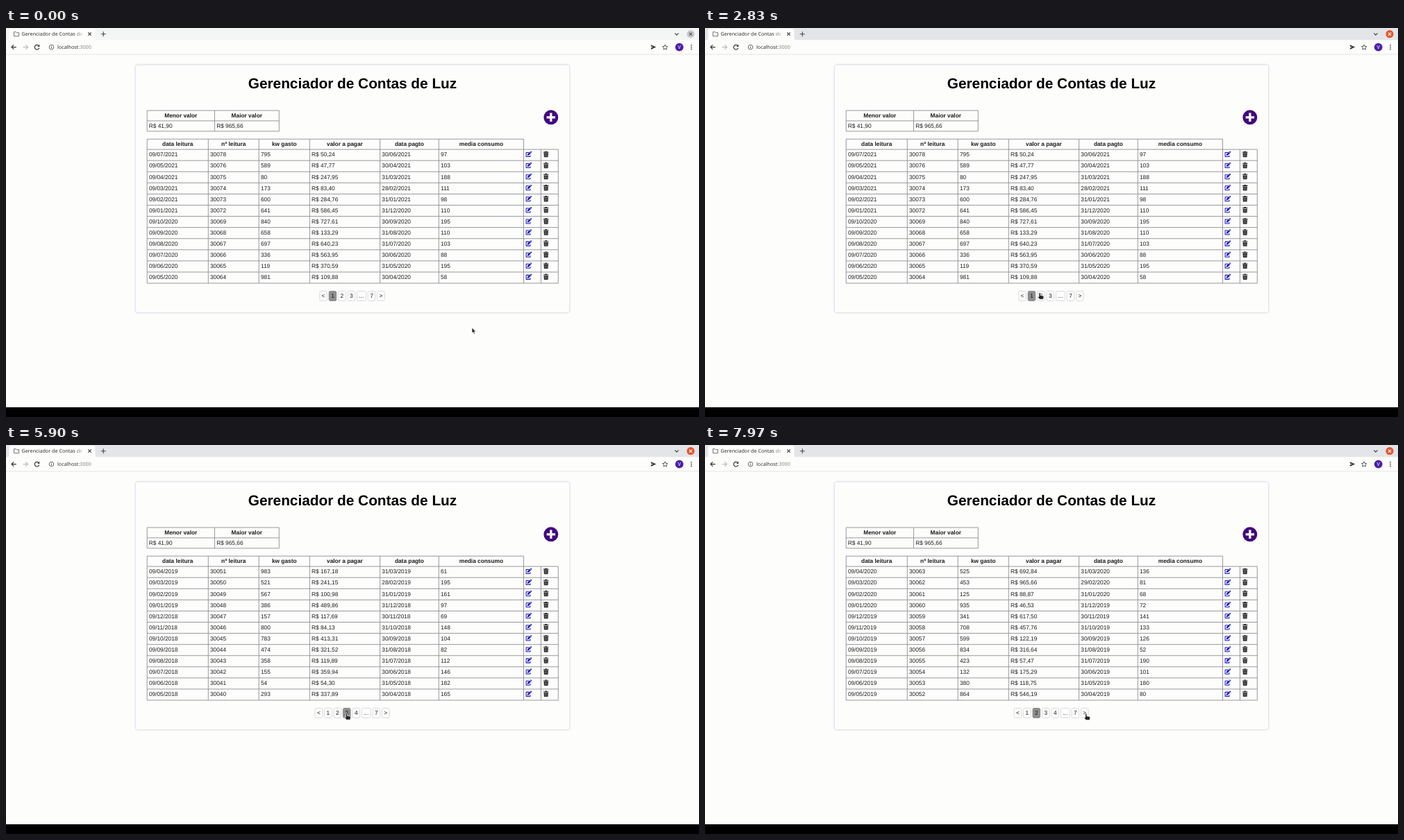
Write an HTML page that moves like this. It is 998 px wide and 561 px high and loops after 8000 ms.

```html
<!DOCTYPE html>
<html lang="pt">
<head>
<meta charset="utf-8">
<title>Gerenciador de Contas de Luz</title>
<style>
html, body { margin: 0; width: 100%; height: 100%; overflow: hidden; background: #fdfdfc; }
svg { display: block; width: 998px; height: 561px; }
text { font: 8.32px "Liberation Sans", Arial, sans-serif; fill: #1a1a1a; white-space: pre; text-rendering: geometricPrecision; }
.th { font-weight: bold; text-anchor: middle; }
.mid { text-anchor: middle; }
.title { font-size: 20.8px; font-weight: bold; text-anchor: middle; fill: #000; }
.ui { font: 7.2px "Noto Sans", "Open Sans", sans-serif; fill: #333; }
.line { fill: none; stroke: #8e8e94; stroke-width: .9; }
.ico { fill: none; stroke: #444; stroke-width: 1.1; }
</style>
</head>
<body>
<svg id="stage" viewBox="0 0 998 561" xmlns="http://www.w3.org/2000/svg"></svg>
<script>
const LOOP = 8000;
const stage = document.getElementById('stage');

// Per reading, newest first: kWh, amount, average
const BILLS = [
  '795 50,24 97|589 47,77 103|80 247,95 188|173 83,40 111|600 284,76 98|641 586,45 110|' +
  '840 727,61 195|658 133,29 110|697 640,23 103|336 563,95 88|119 370,59 195|981 109,88 58',
  '525 692,84 136|453 965,66 81|125 88,87 68|935 46,53 72|341 617,50 141|708 457,76 133|' +
  '599 122,19 126|834 316,64 52|423 57,47 190|132 175,29 101|380 118,75 180|864 546,19 80',
  '983 167,18 61|521 241,15 195|567 100,98 161|386 489,86 97|157 117,69 69|800 84,13 148|' +
  '783 413,31 104|474 321,52 82|358 119,89 112|155 359,94 146|54 54,30 182|293 337,89 165'
].map(p => p.split('|').map(r => r.split(' ')));
const DELETED = [30077, 30071, 30070];

const two = n => String(n).padStart(2, '0');
const date = (d, m, y) => `${two(d)}/${two(m)}/${y}`;

// One reading per month; payment is due on the last day of the month before
function buildPages() {
  let id = 30079;
  return BILLS.map(page => page.map(([kw, cost, avg]) => {
    do id--; while (DELETED.includes(id));
    const month = 2021 * 12 + 6 - (30078 - id);
    const y = Math.floor(month / 12), m = month % 12;
    const due = new Date(y, m, 0);
    return [date(9, m + 1, y), String(id), kw, 'R$ ' + cost,
      date(due.getDate(), due.getMonth() + 1, due.getFullYear()), avg];
  }));
}
const PAGES = buildPages();

const text = (x, y, s, cls = '') => `<text x="${x}" y="${y}" class="${cls}">${s}</text>`;
const path = (d, attrs = 'class="ico"') => `<path d="${d}" ${attrs}/>`;

function chrome() {
  return `
  <rect id="strip" width="998" height="17.5"/>
  <path d="M2 17.5Q4.5 17 4.5 14V4Q4.5 1 7.5 1H125.500Q128.500 1 128.500 4V14Q128.500 17 131 17.500Z" fill="#fdfdfc"/>
  <rect y="17.500" width="998" height="20.500" fill="#fdfdfc"/>
  <rect y="37.500" width="998" height="1" fill="#e6e6e8"/>
  ${path('M11.500 11.800V5.600H14.300L15.300 6.700H18.500V11.800Z', 'fill="none" stroke="#666" stroke-width=".9"')}
  <text x="22.500" y="11.300" class="ui" style="fill:url(#fade)">Gerenciador de Contas de</text>
  ${path('M118.300 6.500l4.400 4.400m0-4.400l-4.400 4.400')}
  ${path('M136.700 8.700h7M140.200 5.200v7')}
  ${path('M963.300 7.500l2.600 2.600l2.600-2.600')}
  <circle id="close" cx="986" cy="8.700" r="5.600"/>
  <path id="cross" d="M983.900 6.600l4.200 4.200m0-4.200l-4.200 4.200" fill="none" stroke-width="1.100"/>
  ${path('M14.800 27.600H8.200M11.200 24.400L8 27.600l3.200 3.200', 'fill="none" stroke="#333" stroke-width="1.200"')}
  ${path('M24.700 27.600h6.600M28.300 24.400l3.200 3.200l-3.200 3.200', 'fill="none" stroke="#bbb" stroke-width="1.200"')}
  ${path('M47.200 25.700A3.300 3.300 0 1 0 47.800 28.600', 'fill="none" stroke="#333" stroke-width="1.200"')}
  ${path('M48.300 23.800v3.200h-3.200Z', 'fill="#333"')}
  <circle cx="65.500" cy="27.600" r="3.300" fill="none" stroke="#555" stroke-width=".9"/>
  ${path('M65.500 27.100v2.200M65.500 25.500v.9', 'stroke="#555" stroke-width=".9"')}
  <text x="74" y="30.200" class="ui">localhost<tspan fill="#888">:3000</tspan></text>
  ${path('M928.500 24.300l7.800 3.300l-7.800 3.300l.9-2.700l3.200-.6l-3.200-.6Z', 'fill="#333"')}
  ${path('M949.200 24l1.100 2.400 2.600.3-1.900 1.800.5 2.600-2.300-1.300-2.300 1.300.5-2.600-1.900-1.800 2.600-.3Z', 'fill="none" stroke="#444" stroke-width=".9"')}
  <circle cx="969.700" cy="27.600" r="5.900" fill="#4a1fa8"/>
  <text x="969.700" y="30.200" class="ui mid" style="fill:#fff">V</text>
  ${[24.8, 27.6, 30.4].map(y => `<circle cx="987" cy="${y}" r=".85" fill="#333"/>`).join('')}`;
}

const COLS = [203.2, 291.3, 364.2, 437.3, 538.6, 623.3, 745.5, 770.4, 795.3];
const HEADS = ['data leitura', 'nº leitura', 'kw gasto', 'valor a pagar', 'data pagto', 'media consumo'];
const ROW = 16.08;
const rowY = i => 175.1 + i * ROW;

function table() {
  let out = path('M203.200 119H393.300V148.900H203.200ZM203.200 133.900H393.300M300.500 119V148.900', 'class="line"') +
    text(251.8, 129, 'Menor valor', 'th') + text(346.8, 129, 'Maior valor', 'th') +
    text(205.8, 144.1, 'R$ 41,90') + text(303.2, 144.1, 'R$ 965,66');
  let d = `M${COLS[0]} 160.200H${COLS[6]}`;
  COLS.forEach((x, i) => d += `M${x} ${i < 7 ? 160.2 : rowY(0)}V${rowY(12)}`);
  for (let i = 0; i <= 12; i++) d += `M${COLS[0]} ${rowY(i)}H${COLS[8]}`;
  out += path(d, 'class="line"');
  HEADS.forEach((h, i) => out += text((COLS[i] + COLS[i + 1]) / 2, 170, h, 'th'));
  for (let r = 0; r < 12; r++) {
    const y = rowY(r) + 10.3;
    for (let c = 0; c < 6; c++) out += text(COLS[c] + 2.7, y, '', 'cell');
    out += `<use href="#edit" x="748" y="${y - 7.6}"/><use href="#trash" x="774" y="${y - 7.8}"/>`;
  }
  return out;
}

const HAND = 'M-1.100 .8Q0-.5 1.100 .8V3.900L5 4.800Q6 5.100 5.900 6.200L5.200 9.800H-.2L-2.700 6.600Q-2.900 5.300-1.100 6Z';
const ARROW = 'M0 0V8.200L1.800 6.600L3 9.300L4.400 8.700L3.200 6.100H5.600Z';

stage.innerHTML = `
<defs>
  <linearGradient id="fade" gradientUnits="userSpaceOnUse" x1="98" x2="113" y1="0" y2="0">
    <stop stop-color="#333"/><stop offset="1" stop-color="#333" stop-opacity="0"/>
  </linearGradient>
  <g id="edit" fill="#1515c4">
    <path d="M5.300 1.700H1.100V7.700H6.900V5.700" fill="none" stroke="#1515c4" stroke-width="1.050" stroke-linejoin="round"/>
    <path d="M2.700 6.300L3 4.200L6.400.9L8.100 2.600L4.800 5.900ZM6.900.5L7.500 0Q8 -.3 8.500.1L9.100.7Q9.400 1.200 9.100 1.600L8.600 2.200Z"/>
  </g>
  <g id="trash" fill="#222">
    <path d="M0 1H2L2.600 .1H4.800L5.400 1H7.400V2.100H0ZM.5 2.700H6.900L6.500 8.600H.9Z"/>
    <path d="M2.300 3.700V7.700M3.700 3.700V7.700M5.100 3.700V7.700" stroke="#aaa" stroke-width=".5"/>
  </g>
</defs>
<rect width="998" height="561" fill="#fdfdfc"/>
${chrome()}
<rect x="187" y="53.500" width="624" height="356.500" rx="2" fill="#fdfdfc" style="filter:drop-shadow(0 0 1.800px #b4b7d8)"/>
${text(499, 87.2, 'Gerenciador de Contas de Luz', 'title')}
<circle cx="784.800" cy="128.800" r="10.500" fill="#41087e"/>
<path d="M778.600 128.800h12.400M784.800 122.600v12.400" stroke="#fff" stroke-width="3.300"/>
${table()}
<g id="pager"></g>
<rect y="547" width="998" height="14"/>
<path id="cursor" fill="#222" stroke="#fff" stroke-width=".7" stroke-linejoin="round"/>`;

const $ = id => document.getElementById(id);
const cells = [...stage.querySelectorAll('.cell')];

// Latest value whose start time has passed
const stepAt = (steps, t) => steps.reduce((v, [at, val]) => t >= at ? val : v, steps[0][1]);
const SELECTED = [[0, 1], [3750, 2], [5080, 3], [6620, 2]];
const LOADED = [[0, 1], [4520, 2], [5800, 3], [7200, 2]];
const FOCUS = 2250;

// Label, hover start, hover end
const HOVERS = [['2', 2840, 3750], ['3', 4850, 5150], ['1', 6370, 6470], ['<', 6510, 7420]];
const FADE = 120;
const clamp = v => Math.max(0, Math.min(1, v));
const hoverAt = (label, t) => HOVERS.reduce((v, [l, a, b]) =>
  l === label ? Math.max(v, Math.min(clamp((t - a) / FADE), 1 - clamp((t - b) / FADE))) : v, 0);

// Time, x, y of the pointer tip
const MOVES = [[0, 671, 432], [1130, 671, 432], [1700, 495, 394], [2100, 494, 400], [2450, 494, 400],
  [2770, 482, 381.5], [2860, 482, 381.5], [3150, 484.5, 385], [4650, 484.5, 385], [4950, 490.5, 386.5],
  [6180, 490.5, 386.5], [6470, 451.5, 386], [7350, 451.5, 386], [7600, 502, 400], [7800, 548.8, 387], [LOOP, 548.8, 387]];

function pointerAt(t) {
  const i = MOVES.findIndex(m => m[0] > t);
  const [t0, x0, y0] = MOVES[i - 1], [t1, x1, y1] = MOVES[i];
  const p = (t - t0) / (t1 - t0), e = p * p * (3 - 2 * p);
  return [x0 + (x1 - x0) * e, y0 + (y1 - y0) * e];
}

function pager(sel, t) {
  const labels = sel === 1 ? ['<', '1', '2', '3', '...', '7', '>'] : ['<', '1', '2', '3', '4', '...', '7', '>'];
  let x = sel === 1 ? 451.7 : 445.1;
  return labels.map(l => {
    const w = l === '...' ? 12.8 : 10.6, shade = Math.round(253 - 57 * hoverAt(l, t));
    const on = l === String(sel);
    const fill = on ? '#8e8e8e' : `rgb(${shade},${shade},${shade})`;
    const out = `<rect x="${x}" y="379.500" width="${w}" height="14" rx="2" fill="${fill}" stroke="${on ? '#858585' : '#d3d3d6'}" stroke-width=".8"/>` +
      text(x + w / 2, 389, l.replace('<', '&lt;'), 'mid');
    x += w + 2.85;
    return out;
  }).join('');
}

let shown = 0, pagerHtml = '';
function draw(t) {
  const page = stepAt(LOADED, t);
  if (page !== shown) {
    PAGES[page - 1].flat().forEach((s, i) => cells[i].textContent = s);
    shown = page;
  }
  const html = pager(stepAt(SELECTED, t), t);
  if (html !== pagerHtml) $('pager').innerHTML = pagerHtml = html;

  const active = t >= FOCUS;
  $('strip').setAttribute('fill', active ? '#e3e5e8' : '#f4f5f5');
  $('close').setAttribute('fill', active ? '#e4572e' : '#c9c9c9');
  $('cross').setAttribute('stroke', active ? '#fff' : '#555');

  const [x, y] = pointerAt(t);
  const hand = (t > 2720 && t < 7420) || t > 7740;
  $('cursor').setAttribute('d', hand ? HAND : ARROW);
  $('cursor').setAttribute('transform', `translate(${x.toFixed(2)} ${y.toFixed(2)})`);
}

let start;
function tick(now) {
  start ??= now;
  draw((now - start) % LOOP);
  requestAnimationFrame(tick);
}
draw(0);
requestAnimationFrame(tick);
</script>
</body>
</html>
```
